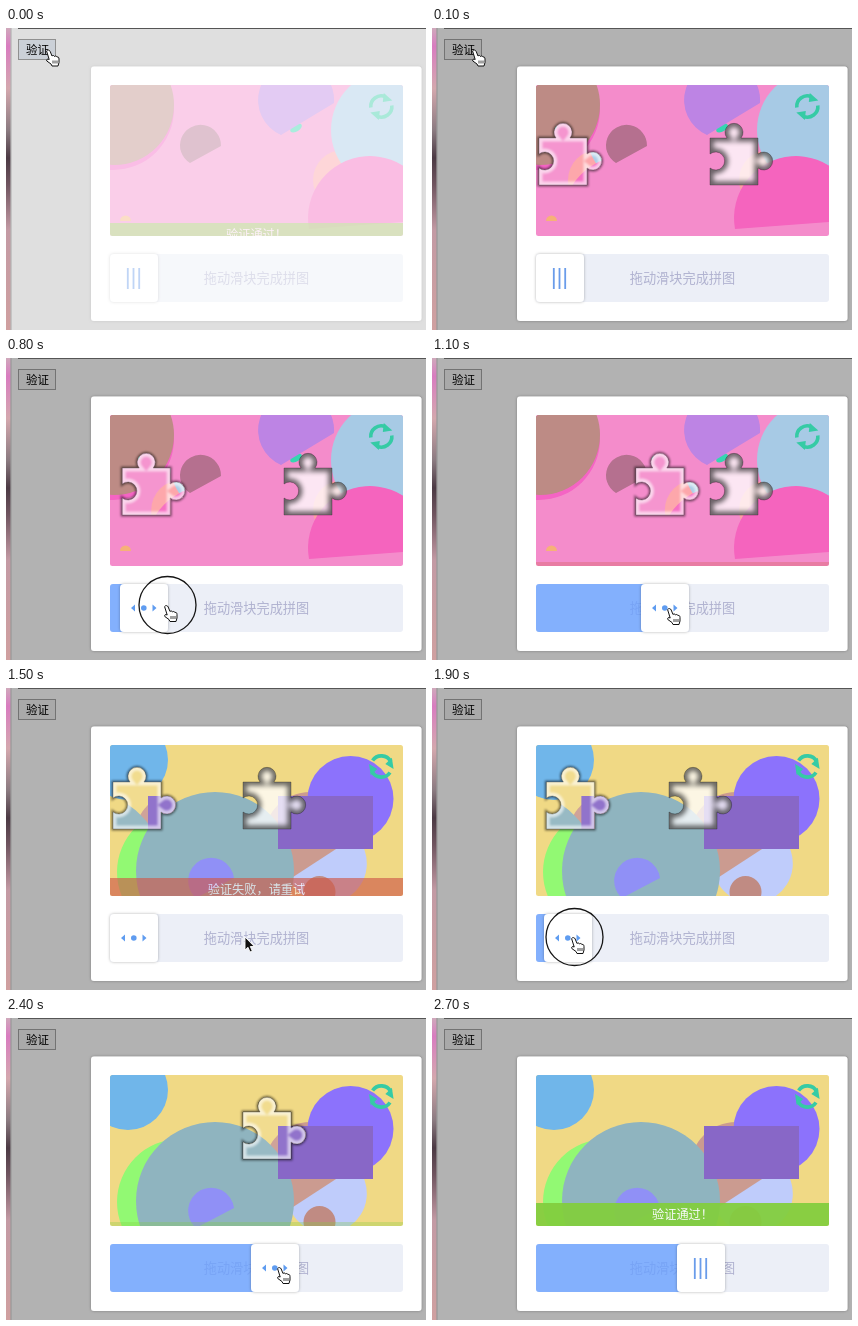
An HTML page for the animation above (2.8 s loop, 420 by 302 pixels).

```html
<!DOCTYPE html>
<html lang="zh">
<head>
<meta charset="utf-8">
<title>Slider puzzle</title>
<style>
html, body { margin: 0; width: 100%; height: 100%; overflow: hidden; background: #fff; }
svg { display: block; width: 420px; height: 302px; }
text { font-family: "Noto Sans CJK SC", "Noto Sans CJK", sans-serif; text-anchor: middle; }
</style>
</head>
<body>
<svg viewBox="0 0 420 302">
  <defs>
    <linearGradient id="desk" x2="0" y2="1">
      <stop offset="0" stop-color="#cfa9bb"/>
      <stop offset=".06" stop-color="#d97cc0"/>
      <stop offset=".2" stop-color="#d4a8ae"/>
      <stop offset=".34" stop-color="#8a7a80"/>
      <stop offset=".43" stop-color="#4c3a44"/>
      <stop offset=".52" stop-color="#705560"/>
      <stop offset=".67" stop-color="#c39aa4"/>
      <stop offset="1" stop-color="#d0a0a0"/>
    </linearGradient>
    <filter id="soft" x="-30%" y="-30%" width="160%" height="160%"><feGaussianBlur stdDeviation="2.4"/></filter>
    <filter id="glow" x="-30%" y="-30%" width="160%" height="160%"><feGaussianBlur stdDeviation="1.2"/></filter>
    <filter id="shade" x="-20%" y="-20%" width="140%" height="140%">
      <feDropShadow dx="0" dy="0" stdDeviation="1.5" flood-opacity=".3"/>
    </filter>
    <path id="jig" d="M0 0H17a9 9 0 1 1 14 0H48V16a9 9 0 1 1 0 14V47H0V30a9 9 0 1 0 0-14Z"/>
    <clipPath id="frame"><rect x="104" y="57" width="293" height="151" rx="2.5"/></clipPath>
    <clipPath id="track"><rect x="104" y="226" width="293" height="48" rx="3"/></clipPath>
    <clipPath id="cut"><use id="cutShape" href="#jig"/></clipPath>

    <g id="pink">
      <path fill="#f48ccb" d="M104 57h293v151H104z"/>
      <circle cx="107" cy="81" r="61" fill="#f564c4"/>
      <circle cx="108" cy="77" r="60" fill="#bd8b85"/>
      <path fill="#b5708f" d="M184 135A20.5 20.5 0 1 1 215 118Z"/>
      <ellipse cx="290" cy="100" rx="6.5" ry="3.6" fill="#35d6b0" transform="rotate(-32 290 100)"/>
      <path fill="#bd84e4" d="M275 107A38 38 0 1 1 328 75Z"/>
      <circle cx="337" cy="152" r="30" fill="#fd9fa4"/>
      <circle cx="385" cy="102" r="60" fill="#a7cae5"/>
      <path fill="#f564be" d="M303 201A62 62 0 1 1 426 192Z"/>
      <path fill="#f6b178" d="M114 193a5.5 5.5 0 0 1 11 0Z"/>
    </g>
    <g id="gold">
      <path fill="#f0d985" d="M104 57h293v151H104z"/>
      <circle cx="122" cy="72" r="40" fill="#70b6ea"/>
      <circle cx="174" cy="184" r="63" fill="#92f973"/>
      <circle cx="304" cy="150" r="46" fill="#cb9b90"/>
      <circle cx="344.5" cy="111" r="43" fill="#8c72fc"/>
      <path fill="#bfccfb" d="M284 191L350 148A40 40 0 1 1 284 191Z"/>
      <circle cx="209" cy="183" r="79" fill="#8fb4bf"/>
      <path fill="#9090f6" d="M190 210A23 23 0 1 1 228 190Z"/>
      <circle cx="313.5" cy="204" r="16" fill="#c08b83"/>
      <path fill="#8867c7" d="M272 108h95v53h-95z"/>
    </g>
    <g id="turn">
      <path fill="none" stroke="#35cba5" stroke-width="3.6" d="M-10.5 1A10.5 10.5 0 0 1 4-9.8"/>
      <path fill="#35cba5" d="M2.5-13.5L11-6 1.5-4.5Z"/>
    </g>
  </defs>

  <rect id="pageBtn" x="12.5" y="11.5" width="37" height="20" stroke="#a5a5a5"/>
  <text x="31.5" y="25.5" font-size="11.5">验证</text>

  <g id="dialog">
    <path d="M0 0h420v302H0z" opacity=".3"/>
    <rect x="85" y="38.5" width="330.5" height="254.5" rx="3" fill="#fff" filter="url(#shade)"/>
    <g clip-path="url(#frame)">
      <use id="scene"/>
      <g id="puzzle">
        <g clip-path="url(#cut)">
          <use class="spot" href="#jig" fill="#fff" opacity=".78"/>
          <use class="spot" href="#jig" fill="none" stroke="#000" stroke-width="7" opacity=".6" filter="url(#soft)"/>
        </g>
        <use class="spot" href="#jig" fill="none" stroke="#000" stroke-opacity=".28"/>
        <g id="piece">
          <use class="spot" href="#jig" fill="none" stroke="#000" stroke-width="3" opacity=".5" filter="url(#glow)"/>
          <g clip-path="url(#cut)">
            <use id="pieceScene"/>
            <use class="spot" href="#jig" fill="#fff" opacity=".08"/>
            <use class="spot" href="#jig" fill="none" stroke="#fff" stroke-width="7" opacity=".6" filter="url(#glow)"/>
          </g>
          <use class="spot" href="#jig" fill="none" stroke="#444" stroke-opacity=".45" stroke-width=".8"/>
        </g>
      </g>
      <g id="banner">
        <path id="bar" d="M104 185h293v23H104z"/>
        <text id="note" x="250.5" y="201.3" font-size="12.2" font-weight="500" fill="#fff"></text>
      </g>
      <g id="refresh">
        <use href="#turn"/>
        <use href="#turn" transform="rotate(180)"/>
      </g>
    </g>
    <g clip-path="url(#track)">
      <path fill="#eceff7" d="M104 226h293v48H104z"/>
      <text x="250.5" y="255" font-size="13.2" fill="#b0b2d0">拖动滑块完成拼图</text>
      <rect id="fill" x="104" y="226" height="48" fill="#6aa0ff" opacity=".8"/>
    </g>
    <g id="knob">
      <rect width="48" height="48" rx="4" fill="#fff" filter="url(#shade)"/>
      <path id="bars" stroke="#6a9cea" stroke-width="1.8" d="M17.8 14v21M23.5 14v21M29.2 14v21"/>
      <g id="arrows" fill="#5f9cf0">
        <path d="M15 20.5v7l-4-3.5ZM32.5 20.5v7l4-3.5Z"/>
        <circle cx="23.8" cy="24" r="2.8"/>
      </g>
    </g>
  </g>

  <path fill="url(#desk)" d="M0 0h4.5v302H0z"/>
  <path fill="#777" opacity=".5" d="M4.5 0h1v302h-1z"/>
  <path fill="#555" d="M12 0h408v1H12z"/>

  <g id="cursor">
    <circle id="ring" cx="3.5" r="28.5" fill="none" stroke="#151515" stroke-width="1.3"/>
    <g id="hand" fill="#fff" stroke="#111" stroke-linejoin="round">
      <path d="M.6 1.6C1.6 0 3.6.4 4.2 2L6 6.5C7 5.5 8.2 6 8.5 7 9.5 6 10.7 6.6 11 7.6 12.2 7 13 8 13 9.5V13L12 16.5H6L5 14.5.8 11.5C0 10 1.5 9 3.2 10Z"/>
      <path stroke-width=".8" d="M7 11v3M9 11v3M11 11v3"/>
    </g>
    <path id="arrow" fill="#111" stroke="#fff" stroke-width=".9" d="M0 0V13L3 10.3 5 15 7.3 14 5.3 9.5H9.3Z"/>
  </g>
</svg>
<script>
const $ = id => document.getElementById(id);
const STEP = 100, STEPS = 28;
const RATIO = 130 / 141;

const rounds = [
  { scene: '#pink', x: 278, y: 110, spin: 0, note: '验证失败，请重试', color: '#ce594b' },
  { scene: '#gold', x: 237, y: 94, spin: 40, note: '验证通过！', color: '#83ce3f' }
];

// [step, value...] rows, interpolated between steps
const slide = [[7, 0], [8, 10], [9, 48], [10, 88], [11, 105], [14, 105], [15, 0],
  [18, 0], [19, 8], [20, 80], [21, 137], [22, 141], [27, 141]];
const pointer = [[0, 40, 21.5], [1, 40, 21.5], [3, 75, 100], [5, 122, 222], [6, 130, 247],
  [7, 134, 247], [8, 158, 247], [10, 224, 249], [11, 235, 250], [14, 239, 249], [15, 239, 249],
  [16, 225, 251], [18, 132, 249], [19, 139, 249], [20, 212, 249], [21, 266, 249],
  [24, 271, 249], [27, 345, 320]];
// [step, drop in px, opacity]
const notice = [[0, 10, .7], [1, 23, 0], [10, 23, 0], [11, 19, .3], [12, 0, .95], [14, 0, .95],
  [15, 5, .65], [16, 23, 0], [23, 23, 0], [24, 19, .3], [25, 0, .95], [27, 0, .95]];

function at(rows, n) {
  const i = rows.findIndex(r => r[0] >= n);
  if (i < 0) return rows[rows.length - 1].slice(1);
  if (i === 0) return rows[0].slice(1);
  const a = rows[i - 1], b = rows[i], k = (n - a[0]) / (b[0] - a[0]);
  return a.slice(1).map((v, j) => v + (b[j + 1] - v) * k);
}
const within = (n, a, b) => n >= a && n <= b;
const show = (id, on) => $(id).setAttribute('visibility', on ? 'inherit' : 'hidden');
const move = (el, x, y) => el.setAttribute('transform', `translate(${x} ${y})`);

function draw(n) {
  const round = rounds[n < 15 ? 0 : 1];
  const message = n === 0 || n > 20 ? rounds[1] : rounds[0];
  const [offset] = at(slide, n);
  const [px, py] = at(pointer, n);
  const [drop, alpha] = at(notice, n);

  $('dialog').setAttribute('opacity', n ? 1 : .42);
  $('pageBtn').setAttribute('fill', n ? '#f1f1f1' : '#e9eef6');

  $('scene').setAttribute('href', round.scene);
  $('pieceScene').setAttribute('href', round.scene);
  for (const el of [$('cutShape'), ...document.querySelectorAll('.spot')]) move(el, round.x, round.y);
  move($('piece'), 107 - round.x + offset * RATIO, 0);
  show('puzzle', within(n, 1, 24));
  $('refresh').setAttribute('transform', `translate(375.3 78.5) rotate(${round.spin})`);

  $('bar').setAttribute('fill', message.color);
  $('note').textContent = message.note;
  move($('banner'), 0, drop);
  $('banner').setAttribute('opacity', alpha);

  $('fill').setAttribute('width', offset + (offset ? 4 : 0));
  move($('knob'), 104 + offset, 226);
  const hover = within(n, 6, 15) || within(n, 18, 25);
  show('arrows', hover);
  show('bars', !hover);

  move($('cursor'), px, py);
  show('cursor', n < 27);
  const hand = n < 2 || (hover && n !== 15);
  show('hand', hand);
  show('arrow', !hand);
  show('ring', within(n, 7, 10) || within(n, 19, 23));
}

let start, last = -1;
function tick(now) {
  start ??= now;
  const n = Math.floor((now - start) / STEP) % STEPS;
  if (n !== last) draw(last = n);
  requestAnimationFrame(tick);
}
draw(0);
requestAnimationFrame(tick);
</script>
</body>
</html>
```
